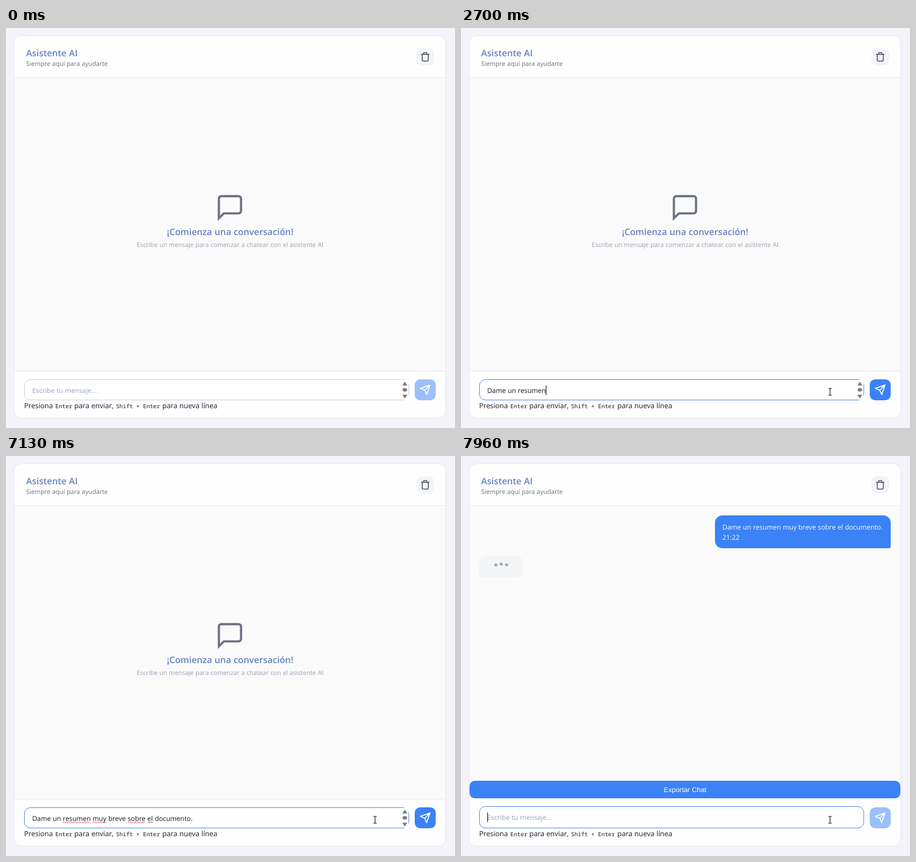
Recreate the animation shown at these times as an HTML page. Size 792 px wide and 707 px high, loop 8000 ms.

```html
<!DOCTYPE html>
<html lang="es">
<head>
<meta charset="utf-8">
<title>Asistente AI</title>
<style>
  html, body { margin: 0; width: 100%; height: 100%; overflow: hidden; background: #f3f4f9; }
  svg { display: block; width: 100%; height: 100%; }
  text {
    font-family: "Open Sans", "Noto Sans", sans-serif;
    font-size: 11.85px; word-spacing: .3px; white-space: pre;
    text-rendering: geometricPrecision;
  }
  .title { font-size: 15.85px; font-weight: 600; fill: #6583bf; }
  .small { font-size: 11.05px; }
  .hint { font-size: 12.53px; fill: #1c1d26; }
  .key { font-family: "Noto Sans Mono", "DejaVu Sans Mono", monospace; font-size: 9.95px; font-weight: 500; word-spacing: 0; }
  .button { font-family: "Liberation Sans", Arial, sans-serif; font-size: 12.2px; word-spacing: 0; }
  .mid { text-anchor: middle; }
  .icon { fill: none; stroke-width: 2; }
  .wave { fill: none; stroke-width: 1; }
</style>
</head>
<body>
<svg viewBox="0 0 792 707" xmlns="http://www.w3.org/2000/svg">
  <rect width="792" height="707" fill="#f3f4f9"/>
  <rect x="14.5" y="13.5" width="761" height="676" rx="13" fill="#fefefe" stroke="#e6e8ee"/>

  <text class="title" x="35.6" y="50">Asistente AI</text>
  <text class="small" x="35.6" y="67" fill="#697079">Siempre aquí para ayudarte</text>
  <rect x="724" y="36" width="31" height="30" rx="9" fill="#f3f4f8"/>
  <g class="icon" transform="translate(730.5 42) scale(.75)" stroke="#454754" stroke-linecap="round" stroke-linejoin="round">
    <path d="M3 6H21M19 6v14a2 2 0 0 1-2 2H7a2 2 0 0 1-2-2V6m3 0V4a2 2 0 0 1 2-2h4a2 2 0 0 1 2 2v2"/>
  </g>

  <rect id="area" x="15" y="87" width="760" fill="#fafafa"/>
  <path d="M15 87.5H775" stroke="#e6e8ec"/>
  <path id="rule" d="M15 .5H775" stroke="#e6e8ec"/>

  <g id="empty">
    <path class="icon" transform="translate(369 290.7) scale(2.17)" stroke="#6b7280" style="stroke-width:1.8"
      d="M21 15a2 2 0 0 1-2 2H7l-4 4V5a2 2 0 0 1 2-2h14a2 2 0 0 1 2 2z"/>
    <text class="title mid" x="395.3" y="366">¡Comienza una conversación!</text>
    <text class="small mid" x="395.3" y="386.5" fill="#98a1b3">Escribe un mensaje para comenzar a chatear con el asistente AI</text>
  </g>

  <g id="chat">
    <path d="M461 105H745a13 13 0 0 1 13 13V160a3 3 0 0 1-3 3H461a13 13 0 0 1-13-13V118a13 13 0 0 1 13-13z" fill="#3b82f6"/>
    <text id="sent" x="461" y="129.5" fill="#fff"></text>
    <text x="461" y="148" fill="#fff">21:22</text>
    <path d="M45 177H97a13 13 0 0 1 13 13V202a13 13 0 0 1-13 13H35a3 3 0 0 1-3-3V190a13 13 0 0 1 13-13z" fill="#f3f4f6"/>
    <g id="dots"><circle cx="61.5" r="2.7"/><circle cx="71" r="2.7"/><circle cx="80.5" r="2.7"/></g>
  </g>
  <g id="export">
    <rect x="15" y="574" width="760" height="31" rx="9.5" fill="#3b82f6"/>
    <text class="button mid" x="395.4" y="594" fill="#fff">Exportar Chat</text>
  </g>

  <rect id="box" x="32.5" width="678" rx="10.5" fill="#fff"/>
  <g id="scroll" fill="#7c7883">
    <rect x="697" y="622" width="13" height="35" fill="#fff"/>
    <path d="M703.5 625.5l3.8 6h-7.6zM703.5 654.5l3.8-6h-7.6z" stroke="#7c7883" stroke-width=".6" stroke-linejoin="round"/>
    <rect x="699.5" y="636.5" width="8" height="6" rx="3"/>
  </g>
  <text id="prompt" x="46.2" fill="#96a3b8">Escribe tu mensaje...</text>
  <text id="typed" x="46.2" y="645" fill="#15161c"></text>
  <g id="waves"></g>
  <rect id="caret" width="1.2" height="17" fill="#15161c"/>

  <rect id="send" x="721" y="621" width="37" height="37" rx="9.5" fill="#3b82f6"/>
  <path class="icon" transform="translate(729.3 629.2) scale(.85)" stroke="#fff" stroke-linejoin="round" stroke-linecap="round"
    d="M22 2L11 13M22 2L15 22L11 13L2 9Z"/>

  <text class="hint" x="32" y="672">Presiona</text>
  <text class="hint key" x="87" y="672">Enter</text>
  <text class="hint" x="120.6" y="672">para enviar,</text>
  <text class="hint key" x="194" y="672">Shift + Enter</text>
  <text class="hint" x="275.8" y="672">para nueva línea</text>

  <g id="mouse">
    <path id="beam" d="M-3 -6H-1Q0 -6 0 -5Q0 -6 1 -6H3M0 -5V5M-3 6H-1Q0 6 0 5Q0 6 1 6H3" fill="none" stroke="#17171c" stroke-width="1.2"/>
    <path id="arrow" d="M0 0V14.5L3.4 11.4L5.6 16.6L8 15.6L5.8 10.6H10.4Z" fill="#fff" stroke="#111"/>
  </g>
</svg>
<script>
const LOOP = 8000, FOCUS = 610, SEND = 7325, LEFT = 46.2;
const message = 'Dame un resumen muy breve sobre el documento.';

// Moment at which each character of the message is typed
const keys = [
  1080, 1350, 1490, 1560, 1630, 1750, 1820, 1890,
  2030, 2100, 2300, 2400, 2500, 2600, 2700, 2840,
  3300, 3630, 3700, 3830, 3970, 4040, 4110, 4310, 4410, 4510,
  4650, 4730, 4800, 4870, 4940, 5070, 5200, 5270, 5330,
  5530, 5600, 5800, 5800, 6000, 6130, 6260, 6260, 6330, 6590
];
const misspelt = [
  ['resumen', 2840, '#e0434b'], ['muy', 3900, '#e0434b'],
  ['sobre', 5070, '#e0434b'], ['el ', 5400, '#6e4a54']
];

const $ = id => document.getElementById(id);
const set = (id, attrs) => { for (const k in attrs) $(id).setAttribute(k, attrs[k]); };
const show = (id, on) => set(id, { visibility: on ? 'visible' : 'hidden' });
const clamp = x => Math.max(0, Math.min(1, x));
const ease = x => 1 - (1 - clamp(x)) ** 2.3;
const mix = (a, b, k) => `rgb(${a.map((v, i) => Math.round(v + (b[i] - v) * k))})`;

$('sent').textContent = message;
const widthOf = n => n ? $('sent').getSubStringLength(0, n) : 0;

function wavePath(word) {
  const start = message.indexOf(word);
  const end = LEFT + widthOf(start + word.trim().length);
  let x = LEFT + widthOf(start), d = `M${x} 648.5`;
  for (let up = true; x + 2 <= end + .5; up = !up) d += `L${x += 2} ${up ? 646.5 : 648.5}`;
  return d;
}

const waves = misspelt.map(([word, at, stroke]) => {
  const el = document.createElementNS('http://www.w3.org/2000/svg', 'path');
  el.setAttribute('class', 'wave');
  el.setAttribute('stroke', stroke);
  el.setAttribute('d', wavePath(word));
  $('waves').append(el);
  return { el, at };
});

function drawMouse(t) {
  const k = ease((t - 70) / 470);
  const x = 690 - 39 * k, y = 708 - 65 * k;
  const overText = y < 677;
  set('mouse', { transform: `translate(${x} ${y})` });
  show('beam', t >= 70 && overText);
  show('arrow', t >= 70 && !overText);
}

function drawInput(t, sent) {
  const count = sent ? 0 : keys.filter(k => k <= t).length;
  const top = sent ? 619 : 621;
  set('box', {
    y: top + .5, height: 657 - top,
    stroke: mix([197, 208, 228], [72, 136, 240], clamp((t - FOCUS + 35) / 70))
  });
  show('scroll', !sent);
  set('prompt', { y: sent ? 643 : 645 });
  show('prompt', !count);
  $('typed').textContent = message.slice(0, count);
  waves.forEach(w => w.el.setAttribute('visibility', !sent && t >= w.at ? 'visible' : 'hidden'));
  set('caret', { x: LEFT + widthOf(count), y: sent ? 630 : 632 });
  show('caret', t >= FOCUS && t < 7130 || t >= 7630);
  const active = ease((t - 1080) / 240) - ease((t - SEND) / 150);
  set('send', { 'fill-opacity': .5 + .5 * active });
}

function drawChat(t, sent) {
  const k = ease((t - SEND) / 300);
  show('empty', !sent);
  show('export', sent);
  const edge = sent ? 604 : 606;
  set('area', { height: edge - 87 });
  set('rule', { transform: `translate(0 ${edge})` });
  set('chat', { opacity: sent ? k : 0, transform: `translate(0 ${5 * (1 - k)})` });
  set('dots', { fill: mix([120, 155, 215], [165, 168, 176], clamp((t - SEND) / 300)) });
  [...$('dots').children].forEach((dot, i) => {
    const p = Math.max(0, t - SEND - 200 * i) / 1400 % 1;
    dot.setAttribute('cy', 196 - 5 * (p < .6 ? Math.sin(Math.PI * p / .6) : 0));
  });
}

function draw(t) {
  const sent = t >= SEND;
  drawMouse(t);
  drawInput(t, sent);
  drawChat(t, sent);
}

const began = performance.now();
function tick() {
  draw((performance.now() - began) % LOOP);
  requestAnimationFrame(tick);
}
tick();
</script>
</body>
</html>
```
